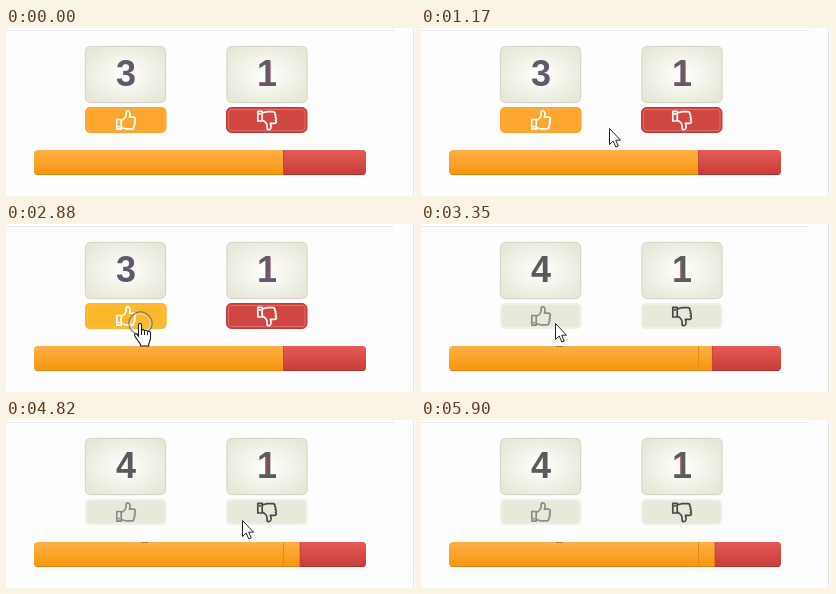
An HTML page that plays this animation: 409 by 168 pixels, repeating every 7.39 s.

```html
<!DOCTYPE html>
<html lang="en">
<head>
<meta charset="utf-8">
<title>Vote buttons</title>
<style>
  html, body { margin: 0; width: 100%; height: 100%; overflow: hidden; background: #fdfdfd; }
  svg { display: block; width: 409px; height: 168px; }
  text { font: bold 36px "Liberation Sans", Arial, sans-serif; text-anchor: middle; }
  .icon { fill: none; stroke: currentColor; stroke-width: 1.7; stroke-linejoin: round; stroke-linecap: round; }
  #after, #hover, #ring, #arrow, #hand { opacity: 0; }
</style>
</head>
<body>
<svg viewBox="0 0 409 168">
  <defs>
    <radialGradient id="panel" cx=".5" cy=".5" r=".62">
      <stop offset="0" stop-color="#fff"/>
      <stop offset=".3" stop-color="#f8f8f2"/>
      <stop offset="1" stop-color="#e6e7d7"/>
    </radialGradient>
    <linearGradient id="orange" x2="0" y2="1">
      <stop offset="0" stop-color="#fdb149"/>
      <stop offset="1" stop-color="#f9930a"/>
    </linearGradient>
    <linearGradient id="red" x2="0" y2="1">
      <stop offset="0" stop-color="#e65b58"/>
      <stop offset="1" stop-color="#c53c36"/>
    </linearGradient>
    <clipPath id="barClip"><rect x="28" y="122" width="332" height="25" rx="4"/></clipPath>
    <g id="box">
      <rect x="78.5" y="17.5" width="82" height="58" rx="6" fill="#f0f0ea"/>
      <rect x="79.5" y="18.5" width="80" height="56" rx="5" fill="url(#panel)" stroke="#d6d7c9"/>
    </g>
    <g id="thumb" class="icon">
      <path d="M110.8 91.5h4.4v9.6h-4.4z"/>
      <path d="M112.6 98.6h.6"/>
      <path d="M115.6 92.3c2.4-1.2 4.2-3 4.4-5.3l.2-3.2c.3-1.3 3.2-1.2 3.7.8.4 1.8 0 3.2-.5 4.6h4.2c2 0 2.3 2.4.8 3 1.2.7 1 2.6-.2 3 .9.8.6 2.5-.5 2.8.6 1.4-.2 2.9-1.8 2.9h-5.400c-2 0-3-.8-5-1.200"/>
    </g>
    <g id="flat">
      <rect x="79" y="79" width="81.500" height="26" rx="5" fill="#f0f1e6"/>
      <rect x="81" y="81" width="77.500" height="22" rx="3" fill="#e8e9da"/>
    </g>
  </defs>

  <path d="M0 2.500H388" stroke="#e9e9e9"/>
  <path d="M407.500 0V168" stroke="#e6e6e6"/>

  <use href="#box"/>
  <use href="#box" x="141.500"/>

  <g id="before">
    <text x="120" y="58" fill="#61596a">3</text>
    <text x="261" y="58" fill="#655a69">1</text>
    <path d="M264 34V54" stroke="#b5505c" stroke-width="1"/>
    <rect x="79" y="79" width="81.500" height="26" rx="5" fill="#fca62f"/>
    <rect x="81.500" y="81.500" width="76.500" height="21" rx="3" fill="none" stroke="#fdad3f"/>
    <g id="hover">
      <rect x="79" y="79" width="81.500" height="26" rx="5" fill="#fdb72d"/>
      <rect x="81.500" y="81.500" width="76.500" height="21" rx="3" fill="none" stroke="#fdbd40"/>
    </g>
    <rect x="220.500" y="79.500" width="80.500" height="25" rx="5" fill="#d04640" stroke="#bd3b36"/>
    <rect x="222.500" y="81.500" width="76.500" height="21" rx="3" fill="none" stroke="#dd6c66"/>
    <g color="#fff">
      <use href="#thumb"/>
      <use href="#thumb" transform="matrix(1 0 0 -1 141 184.500)"/>
    </g>
  </g>

  <g id="after">
    <text x="120" y="58" fill="#5a5a5b">4</text>
    <text x="261" y="58" fill="#5d5a60">1</text>
    <path d="M260 37V54" stroke="#c4505c" stroke-width="1.200"/>
    <use href="#flat"/>
    <use href="#flat" x="141"/>
    <use href="#thumb" color="#8b8b87"/>
    <use href="#thumb" color="#484846" transform="matrix(1 0 0 -1 141 184.500)"/>
  </g>

  <g clip-path="url(#barClip)">
    <rect x="28" y="122" width="332" height="25" fill="url(#orange)"/>
    <path d="M28 146.500H360" stroke="#dd860f"/>
    <g id="marks">
      <path d="M277.500 122V147" stroke="#e08a1c"/>
      <path d="M135 122.500H142" stroke="#b97a38"/>
    </g>
    <g id="share">
      <rect x="277" y="122" width="90" height="25" fill="url(#red)"/>
      <path d="M277 146.500H367" stroke="#b3342f"/>
      <path d="M277.500 122V147" stroke="#c9463a"/>
    </g>
  </g>

  <g id="ring" fill="none">
    <circle r="11.300" stroke="#222"/>
    <circle r="10.300" stroke="#fff"/>
  </g>
  <path id="arrow" d="M.5.5V16.500L4.200 13 6.800 19 9.300 18 6.700 12.200H11.500Z" fill="#fff" stroke="#1c2426" stroke-linejoin="round"/>
  <path id="hand" d="M-1.500 13.500V2c0-2 3-2 3 0V7.500c.5-1.300 2.900-1.100 3 .5.600-1.200 2.900-.9 3 .7.700-1 3-.5 3 1.300V15c0 2.500-1.500 4-1.800 6.500v1.500H.500v-1.500C-1 18.500-4 15.500-5.300 12.700c-.8-1.800 1.300-2.700 2.300-1.500ZM1.500 7.500V12M4.500 8.500V12M7.500 9.500V12" fill="#fff" stroke="#1d1d1d" stroke-width="1.100" stroke-linejoin="round"/>
</svg>

<script>
const LOOP = 7390, VOTE = 3030;

// Runs held keys [time, style] on one element, forever.
function track(id, keys) {
  const frames = keys.map(([t, style]) => ({ offset: t / LOOP, easing: 'steps(1, end)', ...style }));
  frames.push({ ...keys[keys.length - 1][1], offset: 1 });
  document.getElementById(id).animate(frames, { duration: LOOP, iterations: Infinity });
}
const toggle = (id, start, times) =>
  track(id, [0, ...times].map((t, i) => [t, { opacity: (start + i) % 2 }]));
const at = (x, y) => `translate(${x}px, ${y}px)`;

// Pointer moves: start, end, then one position per step.
const moves = [
  [780, 1480, [[394, 157], [350, 143], [302, 128], [257, 114], [219, 105], [188, 100], [167, 101], [153, 102], [143, 103], [138, 103]]],
  [1560, 1560, [[134, 104]]],
  [1790, 1870, [[134, 102], [134, 99]]],
  [3740, 4130, [[140, 100], [162, 101], [197, 101], [231, 99], [252, 96], [259.5, 95]]],
  [4670, 5130, [[254, 97], [236, 100], [210, 102], [184, 102], [164, 100], [153, 99], [150, 98]]],
  [5670, 5900, [[178, 105], [250, 123], [342, 148], [420, 180]]]
];
const path = [[0, { transform: at(420, 180) }]];
for (const [from, to, points] of moves)
  points.forEach(([x, y], i) =>
    path.push([from + (to - from) * i / Math.max(1, points.length - 1), { transform: at(x, y) }]));

const HOVER = 1324;
track('arrow', path.map(([t, s]) => [t, s]));
track('hand', path);
toggle('arrow', 0, [780, HOVER, VOTE, 5900]);
toggle('hand', 0, [HOVER, VOTE]);
toggle('hover', 0, [HOVER, VOTE]);

track('ring', [[0, { transform: at(134.5, 99.5) }], [4000, { transform: at(259.5, 95.5) }], [5000, { transform: at(150.5, 98.5) }]]);
toggle('ring', 0, [2880, VOTE, 4360, 4670, 5130, 5290, 5360, 5440]);

toggle('before', 1, [VOTE]);
toggle('after', 0, [VOTE]);
toggle('marks', 0, [VOTE]);

// The bar goes from 3/4 to 4/5 of 332 px with a cosine swing.
const grow = [[0, { transform: at(0, 0) }]];
for (let t = VOTE; t <= 3510; t += 80) {
  const p = Math.min(1, Math.max(0, (t - 3056) / 400));
  grow.push([t, { transform: at(332 * 0.05 * (0.5 - Math.cos(Math.PI * p) / 2), 0) }]);
}
track('share', grow);
</script>
</body>
</html>
```
